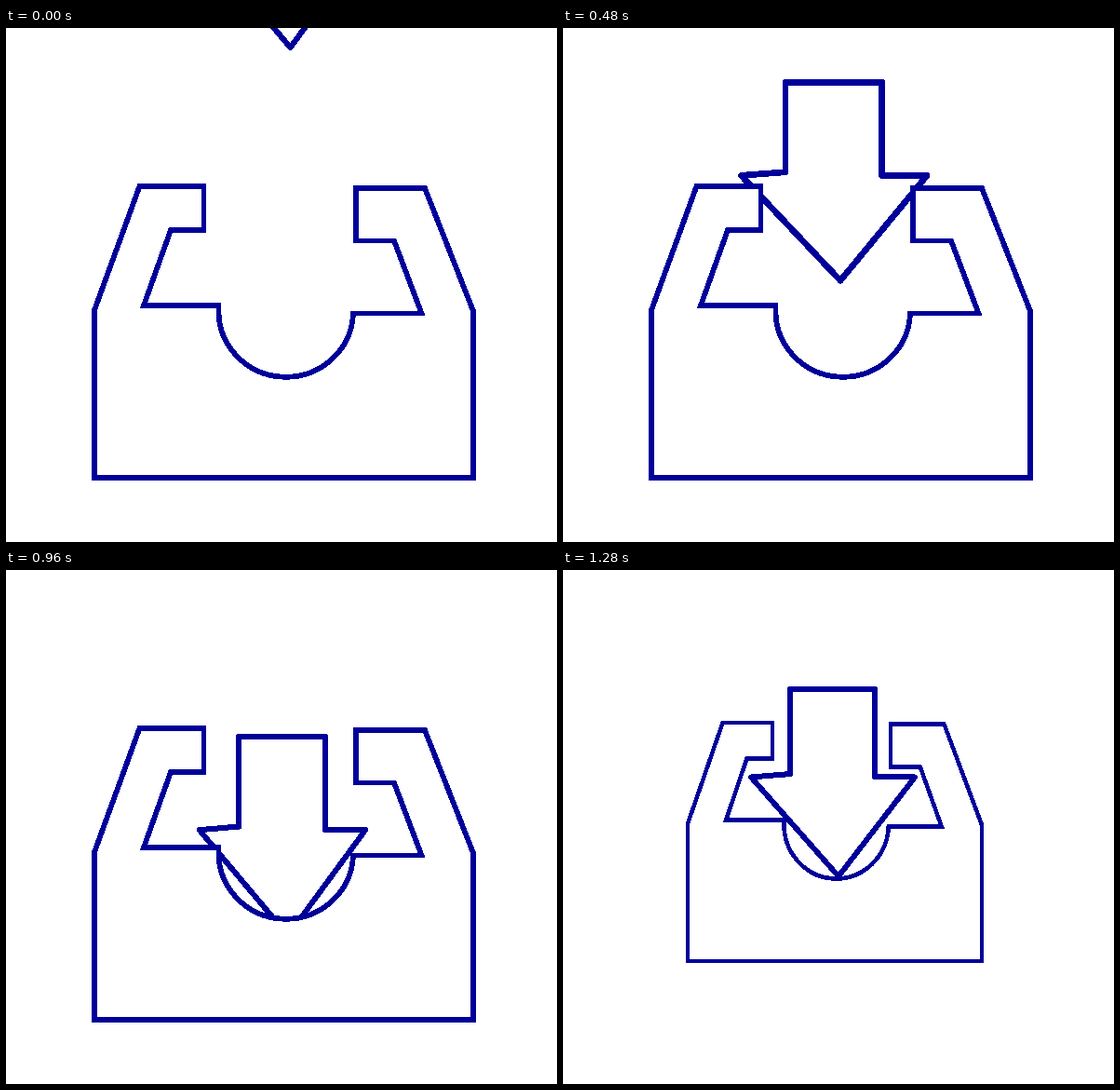
An HTML page that plays this animation: 592 by 552 pixels, repeating every 1.52 s.

```html
<!DOCTYPE html>
<html lang="en">
<head>
<meta charset="utf-8">
<title>Inbox arrow</title>
<style>
  html, body { margin: 0; height: 100%; overflow: hidden; background: #fff; }
  svg { display: block; width: 592px; height: 552px; }
  path { fill: #fff; stroke: #009; shape-rendering: crispEdges; }
  #arrow { stroke-linejoin: round; vector-effect: non-scaling-stroke; }
  #tray { stroke-width: 5.8px; transform-origin: 269px 137px; }
</style>
</head>
<body>
<svg viewBox="0 0 592 552">
  <!-- unit arrow: one wide, one high, tip at the origin -->
  <path id="arrow" d="M-.295-1H.223V-.53H.466L0 0L-.534-.53L-.295-.547Z"/>
  <path id="tray" d="M95 483V303L143.5 170H212.5V217H177L148 298H228.5V301
    A72.3 71 0 0 0 373 306.5H446.5L417 228.5H376V172H450L502 304V483Z"/>
</svg>
<script>
const STEP = 80, LOOP = 1520, LAST = 16, SHRINK_START = 14;

// The arrow drops in, bounces and settles; x and y place its tip.
const keys = [
  { step: 0, x: 305.5, y: 21, w: 182, h: 219 },
  { step: 4, x: 300, y: 196, w: 213.5, h: 219 },
  { step: 8, x: 296, y: 346.5, w: 186, h: 207 },
  { step: 11, x: 304.5, y: 412, w: 180.5, h: 215.5 },
  { step: SHRINK_START, x: 300, y: 353.5, w: 174.5, h: 210.5 },
  { step: LAST, x: 296, y: 329, w: 176, h: 201 }
];

const arrow = document.getElementById('arrow');
const tray = document.getElementById('tray');
const progress = (step, from, to) => Math.max(0, (step - from) / (to - from));

function draw(now) {
  const step = Math.min(LAST, Math.floor(now % LOOP / STEP));
  const next = Math.max(1, keys.findIndex(key => key.step >= step));
  const a = keys[next - 1], b = keys[next];
  const k = progress(step, a.step, b.step);
  const at = name => a[name] + (b[name] - a[name]) * k;

  arrow.setAttribute('transform', `translate(${at('x')} ${at('y')}) scale(${at('w')} ${at('h')})`);
  arrow.setAttribute('stroke-width', at('w') * .034);

  const shrink = progress(step, SHRINK_START, LAST);
  tray.style.transform = `scale(${1 - .2236 * shrink}, ${1 - .182 * shrink})`;
  requestAnimationFrame(draw);
}
draw(0);
</script>
</body>
</html>
```
